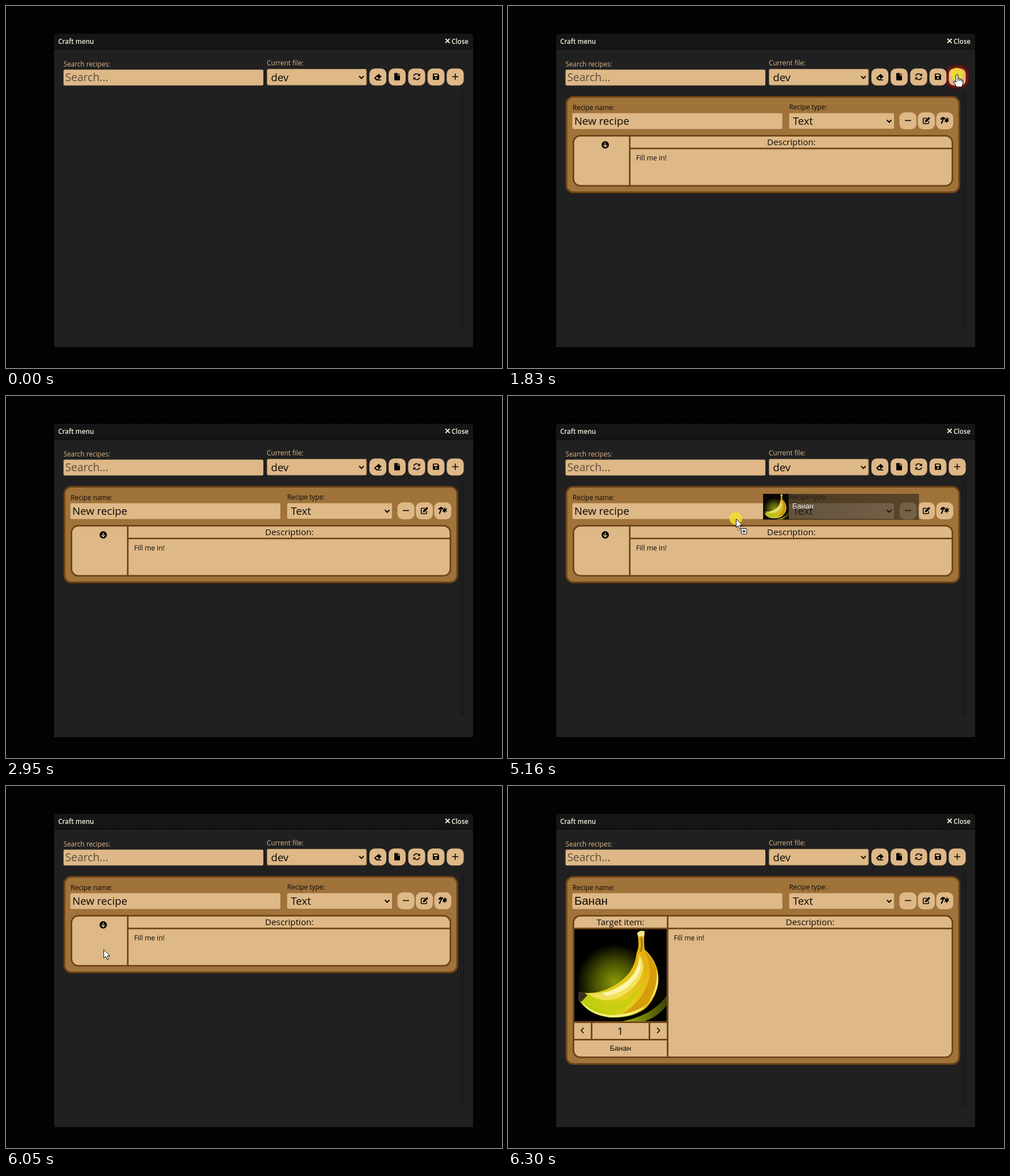
Animation, 875 px wide and 640 px high, one loop 8000 ms. Source, as an HTML page:

```html
<!DOCTYPE html>
<html lang="en">
<head>
<meta charset="utf-8">
<title>Craft menu</title>
<style>
  html, body { margin: 0; width: 100%; height: 100%; overflow: hidden; background: #030303; }
  svg { display: block; }
  text { font-family: "Open Sans", "Noto Sans", sans-serif; fill: #0c0905; white-space: pre; }
  .title { font-size: 11.6px; font-weight: 600; fill: #f0f0e0; }
  .label { font-size: 11.8px; }
  .tan { fill: #deb887; font-weight: 500; }
  .field { font-size: 18.7px; }
  .head { font-size: 15.3px; text-anchor: middle; }
  .note { font-size: 12.2px; }
  .cyr { font-family: "Liberation Sans", Arial, sans-serif; }
  .mid { text-anchor: middle; }
  .box { fill: #deb887; }
  .line { fill: none; stroke: #6d4214; stroke-width: 2.8; }
  .frame { fill: #9f733a; stroke: #6d4214; stroke-width: 3; }
  .stroke { fill: none; stroke: #0c0905; stroke-width: 1.6; }
  .chevron { fill: none; stroke: #0c0905; stroke-width: 2; }
</style>
</head>
<body>
<svg width="875" height="640" viewBox="0 0 875 640">
  <defs>
    <filter id="soft" x="-30%" y="-30%" width="160%" height="160%"><feGaussianBlur stdDeviation="2"/></filter>
    <filter id="shade" x="-10%" y="-10%" width="120%" height="120%"><feGaussianBlur stdDeviation="9"/></filter>
    <pattern id="weave" width="4" height="4" patternUnits="userSpaceOnUse">
      <rect width="4" height="4" fill="#171717"/>
      <path d="M-1 1L1 -1M0 4L4 0M3 5L5 3" stroke="#111" stroke-width="1"/>
    </pattern>
    <radialGradient id="glow" cx=".44" cy=".58" r=".42">
      <stop offset="0" stop-color="#8d9a08"/>
      <stop offset=".5" stop-color="#4c5503"/>
      <stop offset="1" stop-color="#000"/>
    </radialGradient>
    <linearGradient id="floor" x1="0" x2="1">
      <stop offset="0" stop-color="#aab414"/>
      <stop offset="1" stop-color="#3c4403"/>
    </linearGradient>
    <linearGradient id="peel" x1="0" y1="1" x2="1" y2="0">
      <stop offset=".1" stop-color="#b5cd0b"/>
      <stop offset=".4" stop-color="#e3cf1c"/>
      <stop offset=".7" stop-color="#e6b412"/>
      <stop offset="1" stop-color="#d9a916"/>
    </linearGradient>
    <linearGradient id="fade">
      <stop offset="0" stop-color="#221d17" stop-opacity=".68"/>
      <stop offset="1" stop-color="#2a241c" stop-opacity=".58"/>
    </linearGradient>

    <symbol id="banana" viewBox="0 0 163 163">
      <rect width="163" height="163" fill="#000"/>
      <rect width="163" height="163" fill="url(#glow)"/>
      <path d="M85 163Q140 152 163 117V134Q150 154 124 163Z" fill="url(#floor)"/>
      <path d="M146 104Q152 98 150 91Q158 86 163 90V118Q151 128 136 133Z" fill="#060700"/>
      <path id="body" d="M111 7Q117 1 124 4Q122 18 124 36Q145 54 148 82Q149 120 123 142Q99 158 62 156Q21 150 7 123L7 111Q22 115 43 111Q77 102 98 76Q108 61 110 41Q116 29 111 7Z" fill="url(#peel)"/>
      <path d="M124 38Q143 57 146 82Q147 118 121 139Q104 150 83 151Q124 125 133 84Q134 58 124 38Z" fill="#d79d0d"/>
      <path d="M12 127Q31 150 66 152Q104 150 125 135Q106 157 62 156Q24 151 12 127Z" fill="#f3ef77"/>
      <path d="M23 113Q63 118 97 88Q115 68 114 44Q124 58 121 75Q111 107 74 123Q46 131 23 113Z" fill="#f2e15a"/>
      <path d="M48 113Q84 107 106 78Q115 63 115 50Q121 68 111 84Q89 114 57 118Z" fill="#faf5a9"/>
      <path d="M16 124Q49 140 76 130Q102 120 118 99Q111 126 82 142Q38 151 16 124Z" fill="#c4cf10" opacity=".6"/>
      <path d="M145 64Q149 101 131 129Q151 109 148 82Z" fill="#f6e66a"/>
      <path d="M111 7Q117 1 124 4L123 14Q117 10 113 14Z" fill="#f1e48a"/>
      <path d="M118 15Q121 28 117 40" fill="none" stroke="#a97708" stroke-width="3"/>
      <path d="M7 111L16 111L23 117L13 128L7 126Z" fill="#3a3022"/>
    </symbol>

    <g id="arrow">
      <path d="M.5 .5V15.5L4 12.3L6.6 18L9 17L6.500 11.500H11.300Z" fill="#fff" stroke="#111" stroke-width="1"/>
    </g>
    <g id="hand">
      <path d="M-1.800 1.500Q0 -1.500 1.800 1.500V8Q4 6.200 5.200 8.600Q7.300 7.500 8.100 9.800Q10.500 9.200 10.500 12V16Q10.300 18.500 8.500 22H-1Q-2.500 18 -6 13.500Q-5.500 10.500 -1.800 13.500Z" fill="#fff" stroke="#111" stroke-width="1.1"/>
      <path d="M1.800 8V12M5 9V12M8 10V13" stroke="#111"/>
    </g>
    <g id="badge">
      <path d="M2.500 14.500V20.500H9M9 13.500H14.500V17" fill="none" stroke="#444" stroke-dasharray="1 1"/>
      <rect x="9.500" y="17.500" width="9.500" height="9.500" rx="1" fill="#fff" stroke="#111"/>
      <path d="M11.500 22.250H17M14.250 19.500V25" stroke="#111" stroke-width="1.300"/>
    </g>
    <path id="drop" d="M-4 -1.500L0 2.500L4 -1.500" class="chevron"/>
    <rect id="btn" x="-15" y="-15" width="30" height="30" rx="9.500" class="box"/>
  </defs>

  <rect width="875" height="640" fill="#030303"/>
  <rect x="85" y="49" width="739" height="554" fill="#000" filter="url(#shade)"/>
  <path d="M85 603V54Q85 49 90 49H819Q824 49 824 54V603Z" fill="#202020"/>
  <path d="M85 76V54Q85 49 90 49H819Q824 49 824 54V76Z" fill="url(#weave)"/>
  <path d="M85 76.500H824" stroke="#050505"/>
  <text class="title" x="92" y="66.500">Craft menu</text>
  <path d="M775.300 58L782.700 65.400M782.700 58L775.300 65.400" stroke="#f0f0e0" stroke-width="2"/>
  <text class="title" x="786" y="66.500">Close</text>

  <text class="label tan" x="101.500" y="107">Search recipes:</text>
  <rect class="box" x="101.500" y="112.500" width="352.500" height="28" rx="2.500"/>
  <text class="field" x="104.500" y="133" style="font-size:19.300px;fill:#5e4f3d">Search...</text>
  <text class="label tan" x="460" y="105">Current file:</text>
  <rect class="box" x="460.500" y="111.500" width="175.500" height="28.500" rx="2.500" stroke="#8f7750"/>
  <text class="field" x="467.500" y="132.500">dev</text>
  <use href="#drop" x="627" y="125.500"/>
  <rect x="802.500" y="150.500" width="5" height="414.500" rx="2" fill="#1f1f1f" stroke="#111"/>

  <g id="ring" fill="none" stroke="#a01010">
    <rect x="776" y="108.500" width="33.500" height="33.500" rx="11.500" stroke-width="4" filter="url(#soft)"/>
    <rect x="777" y="109.500" width="31.500" height="31.500" rx="10.500" stroke="#760d0d" stroke-width="2"/>
  </g>
  <g transform="translate(656 125.500)">
    <use href="#btn"/>
    <path d="M-6 1L1.500 -5.500L6.500 -.7L1 4.500H6V6H-2.500L-6 2.500ZM-3.800 1.600L-1.300 4.300H-.8L1.500 2.200L-1.300 -.600Z" fill-rule="evenodd"/>
  </g>
  <g transform="translate(690 125.500)">
    <use href="#btn"/>
    <path d="M-4 -7H1V-2.500H5V5Q5 6 4 6H-4Q-5 6 -5 5V-6Q-5 -7 -4 -7ZM2 -7L5 -3.500H2Z"/>
  </g>
  <g transform="translate(724.500 125)">
    <use href="#btn" y=".5"/>
    <path d="M-5.300 -1.200A5.300 5.300 0 0 1 4.300 -2.800M5.300 1.200A5.300 5.300 0 0 1 -4.300 2.800" class="stroke"/>
    <path d="M6 -6V-1.300H1.300ZM-6 6V1.300H-1.300Z"/>
  </g>
  <g transform="translate(758.500 125)">
    <use href="#btn" y=".5"/>
    <path d="M-4.800 -5.500H3L5.500 -3V4.500Q5.500 5.500 4.500 5.500H-4.500Q-5.500 5.500 -5.500 4.500V-4.500ZM-3.800 -4V-1H2.800V-4ZM0 .500A1.700 1.700 0 1 0 .01 .500Z" fill-rule="evenodd"/>
  </g>
  <g transform="translate(792.500 125)">
    <use href="#btn" y=".5"/>
    <path d="M-5.500 0H5.500M0 -5.500V5.500" class="stroke"/>
  </g>

  <g id="recipe">
    <rect id="card" class="frame" x="103" y="160.500" width="693" height="169" rx="12.500"/>
    <text class="label" x="114" y="183.500">Recipe name:</text>
    <rect class="box" x="113.500" y="189.500" width="370.500" height="28" rx="2.500"/>
    <text id="plain" class="field" x="117" y="210">New recipe</text>
    <text id="named" class="cyr" x="117" y="210" font-size="20.500">Банан</text>
    <text class="label" x="496" y="182.500">Recipe type:</text>
    <rect class="box" x="496" y="189.500" width="185" height="27.500" rx="2.500"/>
    <text class="field" x="502.500" y="210">Text</text>
    <use href="#drop" x="672.500" y="203"/>
    <g transform="translate(705.500 202.500)">
      <use href="#btn" y=".5"/>
      <path d="M-5.500 0H5.500" class="stroke"/>
    </g>
    <g transform="translate(738 202.500)">
      <use href="#btn" y=".5"/>
      <path d="M1 -4H-4.500Q-5.500 -4 -5.500 -3V4.500Q-5.500 5.500 -4.500 5.500H3Q4 5.500 4 4.500V1" class="stroke"/>
      <path d="M-2.500 3L-2 0L3.500 -5.500Q4.500 -6.500 5.800 -5.200T6 -3L.5 2.500Z"/>
    </g>
    <g transform="translate(770.500 202.500)">
      <use href="#btn" y=".5"/>
      <path d="M-8 -3L-4 -6.500L1 -5L.5 -2L-1.500 -2.500L-5 6L-7 5L-3.500 -2.800L-6.500 -1ZM4 -7L4.700 -3L8 -4L6 -.8L8 2L4.700 1.300L4 5L2 1.800L-1 2.800L.8 -.5L-.2 -2.500L2.500 -2.600Z"/>
    </g>

    <g id="short">
      <rect class="box line" x="115.400" y="229.400" width="668.600" height="88.400" rx="12.500" style="fill:#deb887"/>
      <path class="line" d="M214.800 229V318M215 251.800H784"/>
      <circle cx="171.500" cy="245.500" r="6.500"/>
      <path d="M171.500 241.500V248.500M168.200 245.700L171.500 249L174.800 245.700" fill="none" stroke="#deb887" stroke-width="1.600"/>
      <text class="head" x="500" y="245.500">Description:</text>
      <text class="note" x="226" y="272.500">Fill me in!</text>
    </g>
    <g id="tall">
      <rect class="line" x="115.400" y="229.400" width="668.600" height="250.200" rx="12.500" style="fill:#deb887"/>
      <use href="#banana" x="117" y="253" width="163" height="163"/>
      <path class="line" d="M281.600 229V480M115 251.800H784M115 417.600H281M115 448.400H281M147.500 418V448M249.500 418V448"/>
      <text class="head" x="198.500" y="245.500">Target item:</text>
      <text class="head" x="533" y="245.500">Description:</text>
      <text class="note" x="292.500" y="272.500">Fill me in!</text>
      <path class="stroke" d="M133.500 427.500L129 432.300L133.500 437M263 427.500L267.500 432.300L263 437"/>
      <text class="field mid" x="198" y="440">1</text>
      <text class="cyr mid" x="198.500" y="468" font-size="13">Банан</text>
    </g>
  </g>

  <g id="pointer">
    <g id="ghost">
      <rect x="48" y="-44" width="275" height="46" fill="url(#fade)"/>
      <use href="#banana" x="48" y="-44" width="45" height="45" opacity=".88"/>
      <text class="cyr" x="99.500" y="-18" font-size="13" style="fill:#f3f0ea">Банан</text>
    </g>
    <circle id="press" cy="-.5" r="11.300" fill="#f0de2c" opacity=".85"/>
    <use id="tip" href="#arrow"/>
    <use id="palm" href="#hand"/>
    <use id="plus" href="#badge"/>
  </g>
</svg>
<script>
  const LOOP = 8000;
  const el = id => document.getElementById(id);
  const show = (id, on) => { el(id).style.display = on ? "" : "none"; };
  const within = (t, a, b) => t >= a && t < b;
  const easeOut = p => 1 - (1 - p) ** 2;
  const easeBoth = p => p * p * (3 - 2 * p);
  const mix = (a, b, p) => a + (b - a) * p;

  // progress from 0 to 1 held at n evenly spaced moments
  const held = (t, from, to, n) => {
    const p = Math.min(1, Math.max(0, (t - from) / (to - from)));
    return Math.floor(p * (n - 1) + 1e-6) / (n - 1);
  };

  const visits = [
    { on: 790, off: 2880, from: [859, 123], to: [792, 121], go: [790, 1140], ease: easeOut },
    { on: 5160, off: 6250, from: [402, 217], to: [172, 289], go: [5160, 5550], ease: easeBoth }
  ];

  function draw(t) {
    const visit = visits.find(v => within(t, v.on, v.off));
    let x = 0, y = 0;
    if (visit) {
      const p = visit.ease(held(t, ...visit.go, 6));
      x = mix(visit.from[0], visit.to[0], p);
      y = mix(visit.from[1], visit.to[1], p);
      el("pointer").setAttribute("transform", `translate(${Math.round(x)} ${Math.round(y)})`);
    }
    const over = x > 777 && x < 808 && y < 141;
    const drag = within(t, 5160, 6050);
    const filled = t >= 6100;

    show("pointer", visit);
    show("tip", !over);
    show("palm", over);
    show("ghost", drag);
    show("plus", drag);
    show("press", drag || within(t, 1690, 1890));
    el("ring").style.opacity = over ? 1 : within(t, 2880, 2950) ? .5 : 0;

    show("recipe", t >= 1820);
    show("short", !filled);
    show("tall", filled);
    show("plain", !filled);
    show("named", filled);
    el("card").setAttribute("height", filled ? 331 : 169);
  }

  function tick() {
    draw(performance.now() % LOOP);
    requestAnimationFrame(tick);
  }
  tick();
</script>
</body>
</html>
```
